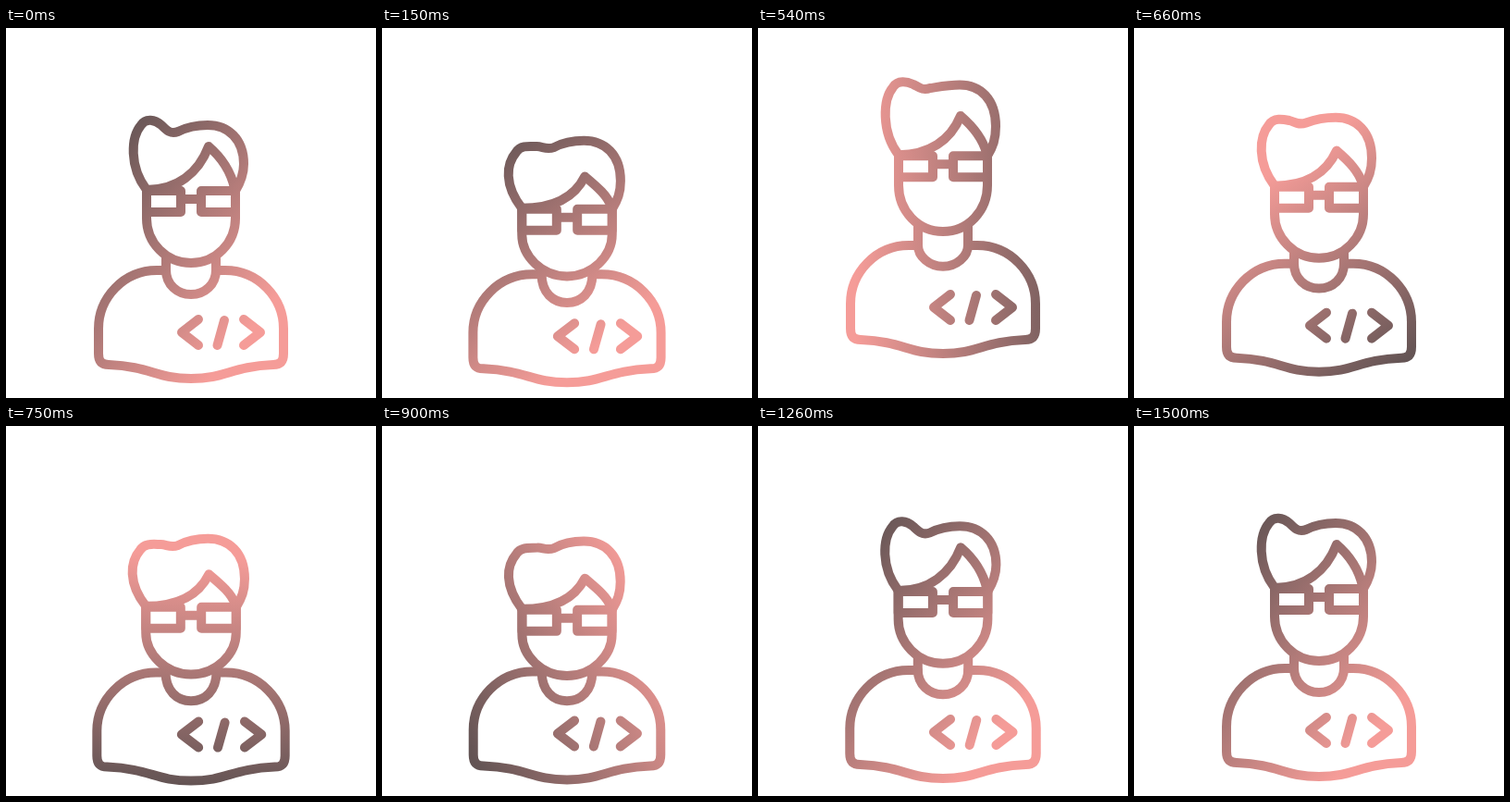
Write an HTML page that moves like this. It is 400x400 px and loops after 3.53 s.

```html
<!DOCTYPE html>
<html lang="en">
<head>
<meta charset="utf-8">
<title>Developer</title>
<style>
  html, body { margin: 0; width: 100%; height: 100%; overflow: hidden; background: #fff; }
  svg { display: block; width: 100%; height: 100%; }
  path { fill: none; stroke: url(#tint); stroke-width: 10; stroke-linecap: round; stroke-linejoin: round; }
  .solid { fill: #fff; }
</style>
</head>
<body>
<svg viewBox="0 0 400 400">
  <defs>
    <linearGradient id="tint" gradientUnits="userSpaceOnUse">
      <stop offset="0" stop-color="#635454"/>
      <stop offset="1" stop-color="#f59c98"/>
    </linearGradient>
  </defs>
  <!-- each point is x,y plus the letter of the part that shifts it -->
  <path data-d="M173,262b L163,262b C127,262b 100,292b 100,325b L100,352b C100,361b 104,364b 111,364b
    C157,366b 162,379b 200,379b C238,379b 243,366b 289,364b C296,364b 300,361b 300,352b
    L300,325b C300,292b 273,262b 237,262b L227,262b"/>
  <path data-d="M173,240k L173,262b C173,277c 185,288c 200,288c C215,288c 227,277c 227,262b L227,240k"/>
  <path data-d="M208,315b L190,329b L208,343b M236,316b L228.5,343b M257,315b L275,329b L257,343b"/>
  <path class="solid" data-d="M152,176g L152,206m C152,232k 173,254k 200,254k C227,254k 248,232k 248,206m L248,176g"/>
  <path data-d="M152,175g C133,150g 135,118l 146,105l C151,97l 161,99l 168,105n C174,111d 178,115d 186,112d
    C196,107r 207,105r 218,105r C240,105r 257,120r 257,147q C257,158g 254,166g 248,176g"/>
  <path data-d="M152,175g C185,175g 208,157p 219,128f C233,140f 243,155p 247,173g"/>
  <path data-d="M152,176g L189,176g L189,199g L152,199g Z M211,176g L248,176g L248,199g L211,199g Z M189,185g L211,185g"/>
</svg>
<script>
const LOOP = 3530, MOVE = 1500, STEP = 30;

// turning points of the hop: [time, shift]
const head = [[0, 0], [110, 22], [460, -46], [830, 28], [1090, -2.5], [1260, 3], [1500, 0]];
const body = [[0, 0], [90, 7.5], [430, -35], [815, 7.5], [1020, -3.5], [1260, 2], [1500, 0]];

const paths = [...document.querySelectorAll('path')];
const tint = document.getElementById('tint');

const mix = (a, b, u) => a + (b - a) * u;

function ease(t, from, to) {
  const u = Math.min(1, Math.max(0, (t - from) / (to - from)));
  return (1 - Math.cos(Math.PI * u)) / 2;
}

function swing(keys, t) {
  let i = 0;
  while (i < keys.length - 2 && t >= keys[i + 1][0]) i++;
  const [[t0, y0], [t1, y1]] = keys.slice(i, i + 2);
  return mix(y0, y1, ease(t, t0, t1));
}

// every part follows the head, the body, or something between
function pose(t) {
  const g = swing(head, t), b = swing(body, t);
  const flop = 8 * ease(t, 0, 150) * (1 - ease(t, 900, 1080)) + 0.3 * (g - b);
  const v = {
    g, b,
    k: mix(b, g, 0.65),            // chin
    c: mix(b, g, 0.3),             // collar
    f: g + flop,                   // fringe
    l: 1.15 * g + 0.5 * flop,      // quiff
    d: 1.18 * g - 0.5 * flop,      // dip in the hair
    r: 1.1 * g - 0.4 * flop        // crown
  };
  v.m = mix(g, v.k, 0.5);
  v.n = mix(v.l, v.d, 0.5);
  v.q = mix(v.r, g, 0.5);
  v.p = mix(g, v.f, 0.5);
  return v;
}

function draw(t) {
  const v = pose(t);
  const scale = 1 + Math.max(0, v.b) * 0.0037;
  const place = (_, x, y, part) =>
    `${(200 + (x - 200) * scale).toFixed(2)} ${(+y + v[part]).toFixed(2)}`;
  for (const path of paths) {
    path.setAttribute('d', path.dataset.d.replace(/([\d.]+),([\d.]+)([a-z])/g, place));
  }

  // the dark end of the gradient makes one turn around the figure
  const a = (-50 + 360 * ease(t, 0, 1260)) * Math.PI / 180;
  [150, -100].forEach((reach, i) => {
    tint.setAttribute('x' + (i + 1), (205 + reach * Math.sin(a)).toFixed(2));
    tint.setAttribute('y' + (i + 1), (240 - reach * Math.cos(a)).toFixed(2));
  });
}

const start = performance.now();
function tick(now) {
  const t = Math.max(0, now - start) % LOOP;
  draw(Math.min(MOVE, Math.floor(t / STEP) * STEP));
  requestAnimationFrame(tick);
}
draw(0);
requestAnimationFrame(tick);
</script>
</body>
</html>
```
